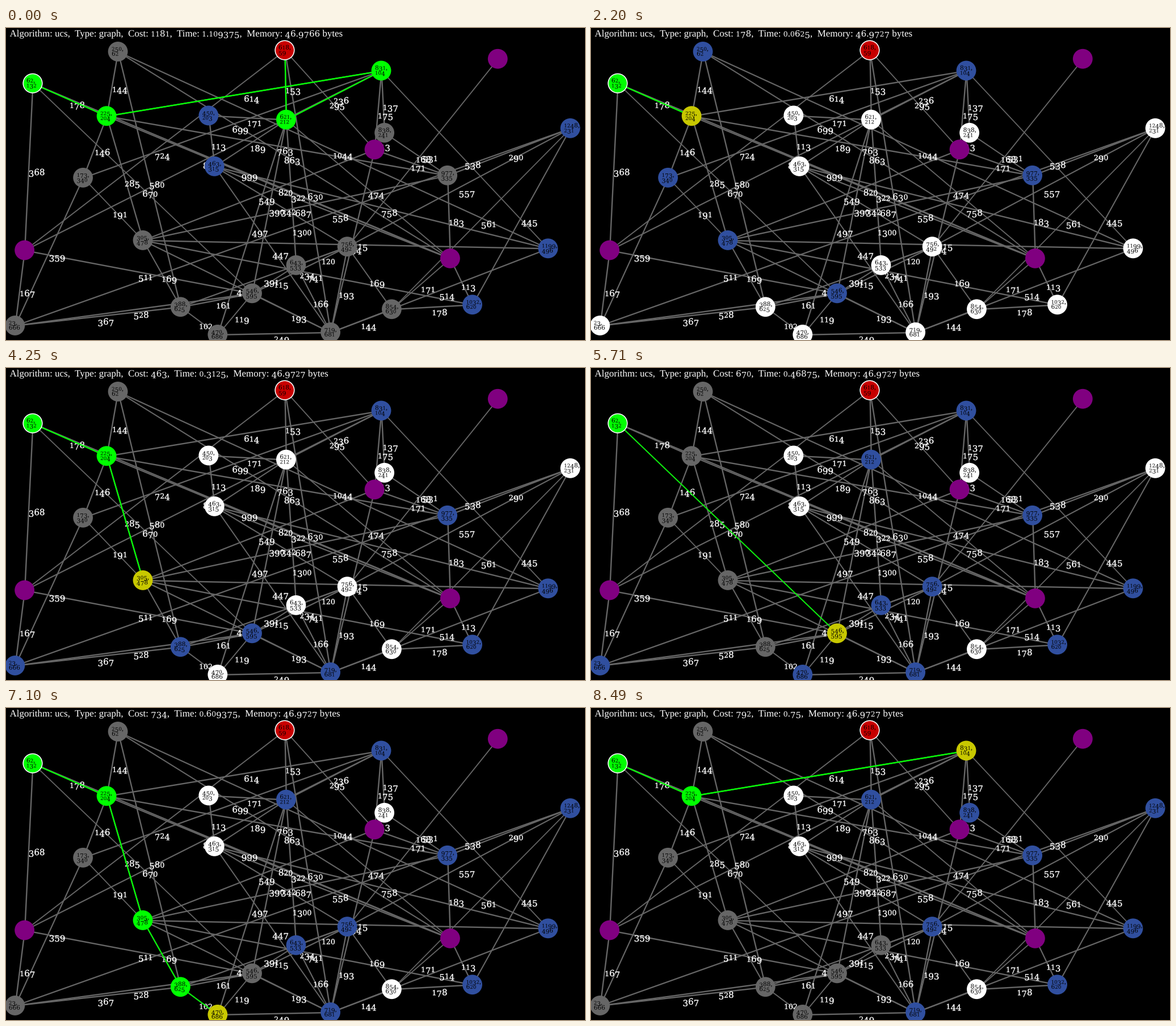
A matplotlib script for the animation above (9150 ms loop, 1020 px wide and 549 px high).

```python
from itertools import groupby
from math import dist, inf

import matplotlib.pyplot as plt
from matplotlib.animation import FuncAnimation
from matplotlib.collections import LineCollection, PatchCollection
from matplotlib.patches import Circle, PathPatch
from matplotlib.path import Path
from matplotlib.text import Text
from matplotlib.textpath import TextPath, text_to_path
from matplotlib.transforms import Affine2D

WIDTH, HEIGHT, DPI = 1020, 549, 64
PT = 72 / DPI
LOOP, INTERVAL = 9150, 30

NODES = dict(
    A=(62, 132), B=(225, 204), C=(250, 62), D=(618, 59), E=(831, 104),
    F=(450, 203), G=(621, 212), H=(838, 241), I=(1248, 231), J=(977, 335),
    K=(173, 340), L=(463, 315), M=(305, 478), N=(756, 492), O=(643, 533),
    P=(546, 595), Q=(388, 625), R=(23, 666), S=(470, 686), T=(719, 681),
    U=(854, 630), V=(1032, 620), W=(1199, 496),
    w=(1088, 78), x=(816, 278), y=(44, 500), z=(983, 518))
EDGES = """AB Ay AP Az BC BE BK BM BJ Bz CQ CW Cz Dy DG Dx DT EG EK EH Ex EW Ey
    FG FL GL Gz GS GP GO HJ Hx xJ xM xT wN IJ IN IU IV IR JM Jz KR KM LN Lz LW LT
    MQ MW MT MV NQ NP NO NU NT OP OT PQ PR PS PT Py QR QS Ry ST TU TW Uz UV Vz""".split()
START, GOAL, WALLS = "A", "D", "wxyz"

GREEN, YELLOW, RED = "#00ff00", "#c8c800", "#c80000"
BLUE, PURPLE, GRAY = "#304f9f", "#800080", "#666666"

# When each search step appears, and the timer it reports.
STEP_TIMES = [2200, 2930, 3590, 4250, 4980, 5710, 6370, 7100, 7770, 8490]
CLOCKS = [0.0625, 0.125, 0.21875, 0.3125, 0.390625, 0.46875, 0.546875,
          0.609375, 0.6875, 0.75]


def weight(a, b):
    return round(dist(NODES[a], NODES[b]))


def place(name):
    x, y = NODES[name]
    return x * 0.7985 - 2.5, y * 0.798 - 8


def search():
    """Uniform-cost search; one (node, cost, trail, seen, closed) per step."""
    links = {n: [] for n in NODES}
    for a, b in EDGES:
        links[a].append(b)
        links[b].append(a)
    cost, parent, closed, steps = {START: 0}, {}, set(), []
    node = None
    while node != GOAL:
        node = min((n for n in cost if n not in closed), key=cost.get)
        closed.add(node)
        trail = [node]
        while trail[-1] in parent:
            trail.append(parent[trail[-1]])
        if node != GOAL:
            for other in links[node]:
                total = cost[node] + weight(node, other)
                if other not in WALLS and total < cost.get(other, inf):
                    cost[other], parent[other] = total, node
        steps.append((node, cost[node], trail, set(cost), set(closed)))
    return steps


def node_color(name, step):
    node, _, trail, seen, closed = step
    rules = [(name in WALLS, PURPLE), (name == START, GREEN), (name == GOAL, RED),
             (name == node, YELLOW), (name in trail, GREEN), (name in closed, GRAY),
             (name in seen, BLUE)]
    return next((color for hit, color in rules if hit), "white")


def font(family, size):
    return Text(family=family, size=size).get_fontproperties()


def old_style(text, x, y, size):
    """Outline of a text line with old-style figures, baseline at (x, y)."""
    parts = []

    def add(run, family, scale, drop=0):
        nonlocal x
        prop = font(family, size * scale)
        flip = Affine2D().scale(1, -1).translate(x, y + drop * size)
        parts.append(TextPath((0, 0), run, prop=prop).transformed(flip))
        x += text_to_path.get_text_width_height_descent(run, prop, False)[0]

    for is_digit, run in groupby(text, str.isdigit):
        if not is_digit:
            add("".join(run), "Liberation Serif", 1.06)
            continue
        for digit in run:
            add(digit, "DejaVu Serif", 0.78 if digit in "012" else 0.94,
                0.18 if digit in "34579" else 0)
    return Path.make_compound_path(*parts)


def header(cost, clock, memory):
    text = (f"Algorithm: ucs,  Type: graph,  Cost: {cost},  "
            f"Time: {clock},  Memory: {memory} bytes")
    return old_style(text, 6.5, 15, 16)


def segments(pairs):
    """Line segments on pixel centres; slanted strokes come out thinner."""
    lines = [[(x + 0.5, y + 0.5) for x, y in map(place, pair)] for pair in pairs]
    widths = [2.4 * PT * max(abs(p[0] - q[0]), abs(p[1] - q[1])) / dist(p, q)
              for p, q in lines]
    return lines, widths


def edge_label(a, b):
    (x1, y1), (x2, y2) = place(a), place(b)
    return old_style(str(weight(a, b)), (x1 + x2) / 2, (y1 + y2) / 2 + 14.7, 16)


def node_label(name):
    x, y = place(name)
    first, second = NODES[name]
    return Path.make_compound_path(old_style(f"{first},", x - 11, y - 1.5, 11.2),
                                   old_style(str(second), x - 11, y + 7.2, 11.2))


steps = search()
scenes = [(0, steps[-1], header(steps[-1][1], 1.109375, 46.9766)),
          (1530, steps[0], header(0, 0.0, 0)),
          (1600, steps[0], header(0, 0.0, 46.9727))]
scenes += [(time, step, header(step[1], clock, 46.9727))
           for time, step, clock in zip(STEP_TIMES, steps[1:], CLOCKS)]

fig = plt.figure(figsize=(WIDTH / DPI, HEIGHT / DPI), dpi=DPI, facecolor="black")
ax = fig.add_axes([0, 0, 1, 1])
ax.set(xlim=(0, WIDTH), ylim=(HEIGHT, 0))
ax.axis("off")


def add_text(path, color, zorder, stroke=0):
    return ax.add_patch(PathPatch(path, facecolor=color, edgecolor=color,
                                  linewidth=stroke * PT, zorder=zorder))


lines, widths = segments(EDGES)
ax.add_collection(LineCollection(lines, linewidths=widths, colors=GRAY, zorder=1))
add_text(Path.make_compound_path(*(edge_label(a, b) for a, b in EDGES)),
         "white", 2, stroke=0.35)
trail_lines = ax.add_collection(LineCollection([], colors=GREEN, zorder=3))
ringed = [n in (START, GOAL) for n in NODES]
discs = ax.add_collection(PatchCollection(
    [Circle(place(n), 16.8 if ring else 17.4) for n, ring in zip(NODES, ringed)],
    edgecolors=["white" if ring else "none" for ring in ringed],
    linewidths=[1.6 * PT if ring else 0 for ring in ringed], zorder=4))
add_text(Path.make_compound_path(*(node_label(n) for n in NODES if n not in WALLS)),
         "black", 5)
title = add_text(scenes[0][2], "white", 6)


def draw(frame):
    now = frame * INTERVAL + INTERVAL - 10
    _, step, heading = max((s for s in scenes if s[0] <= now), key=lambda s: s[0])
    trail = step[2]
    lines, widths = segments(zip(trail, trail[1:]))
    trail_lines.set_segments(lines)
    trail_lines.set_linewidths(widths or [0])
    discs.set_facecolor([node_color(n, step) for n in NODES])
    title.set_path(heading)
    return trail_lines, discs, title


anim = FuncAnimation(fig, draw, frames=LOOP // INTERVAL, interval=INTERVAL,
                     repeat=True, cache_frame_data=False)
plt.show()
```
